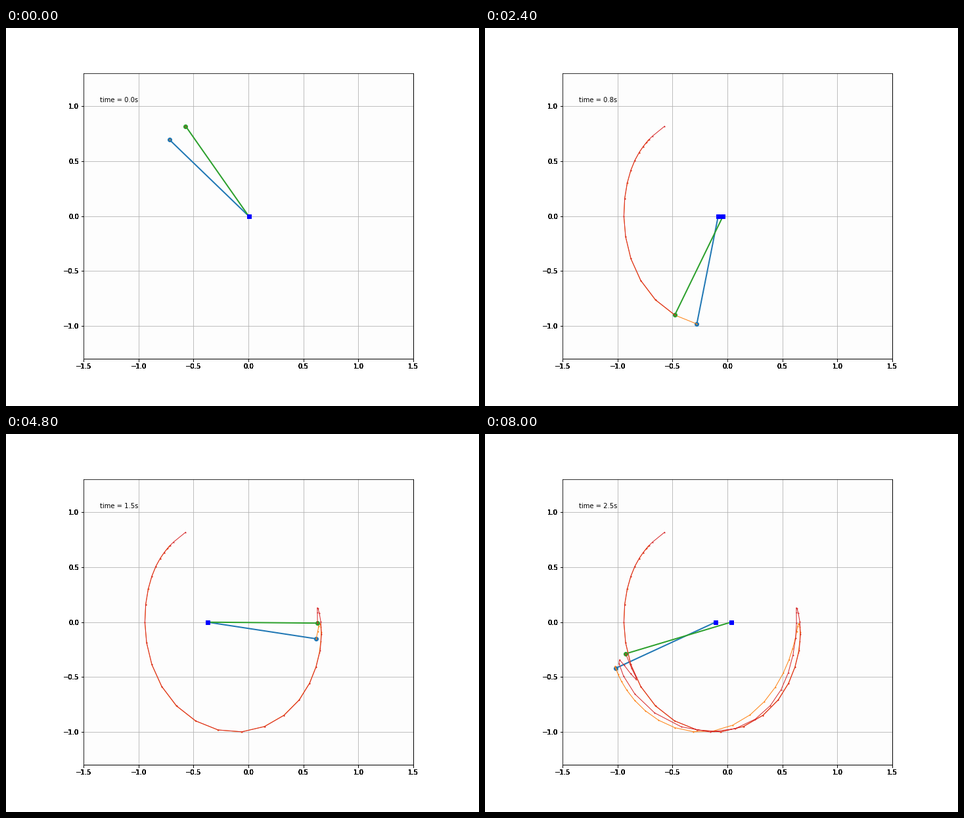
Recreate the animation shown at these times as a matplotlib script. Size 720x576 px, loop 8.16 s.

```python
import numpy as np
import matplotlib.pyplot as plt
from matplotlib.animation import FuncAnimation

FRAMES, INTERVAL, DT = 51, 160, 0.05
WIDTH, HEIGHT, UNIT = 720, 576, 167.4
CENTER_X, CENTER_Y = 369, 286.74
LAYERS = 8

plt.rcParams["font.family"] = "DejaVu Sans"
plt.rcParams["font.size"] = 10


def spline(start, spacing, keys):
    """Return a smooth cubic curve through evenly spaced keys."""
    k = np.asarray(keys, float)
    count = len(k)
    system = 4 * np.eye(count) + np.eye(count, k=1) + np.eye(count, k=-1)
    system[[0, -1]] = np.eye(count)[[0, -1]]
    rhs = 6 * np.gradient(k)
    rhs[[0, -1]] = np.gradient(k, edge_order=2)[[0, -1]]
    slope = np.linalg.solve(system, rhs)

    def curve(step):
        u = np.clip((np.asarray(step) - start) / spacing, 0, count - 1)
        i = np.minimum(u.astype(int), count - 2)
        t = u - i
        rise = k[i + 1] - k[i]
        bend = (1 - t) * (slope[i] - rise) - t * (slope[i + 1] - rise)
        return k[i] + t * rise + t * (1 - t) * bend

    return curve


# Angles in degrees from upright, counter-clockwise; cart positions in metres.
true_angle = spline(0, 5, [46, 59.4, 100.8, 168.8, 236.3, 267.6,
                           261.3, 223.6, 163.9, 122.6, 114.8])
true_cart = spline(0, 5, [0.003, 0.020, 0.056, -0.084, -0.277, -0.341,
                          -0.372, -0.355, -0.200, -0.121, -0.108])
drift_angle = spline(23, 3, [255.2, 274.7, 275, 252.5, 220.5,
                             179, 130.8, 110, 121.4, 106.7])
drift_cart = spline(23, 3, [-0.314, -0.352, -0.369, -0.358, -0.260,
                            -0.140, -0.085, -0.042, 0.023, 0.033])


def pole(angle, cart):
    a = np.radians(angle)
    return cart, cart - np.sin(a), np.cos(a)


# The estimate settles, trails the truth by about one step, then drifts away.
step = np.arange(FRAMES)
trailing = step < 23
guess_angle = np.where(trailing, true_angle(step - 1) - 11 * 0.24 ** step,
                       drift_angle(step))
guess_cart = np.where(trailing, true_cart(step - 1.1), drift_cart(step))
poles = [pole(true_angle(step), true_cart(step)),
         pole(guess_angle, guess_cart)]

fig = plt.figure(figsize=(WIDTH / 72, HEIGHT / 72), dpi=72, facecolor="white")
w, h = 3 * UNIT / WIDTH, 2.6 * UNIT / HEIGHT
left, bottom = CENTER_X / WIDTH - w / 2, 1 - CENTER_Y / HEIGHT - h / 2

# Stacked axes give the tick labels their heavy look.
for _ in range(LAYERS):
    ax = fig.add_axes([left, bottom, w, h], facecolor="#fdfdfd",
                      xlim=(-1.5, 1.5), ylim=(-1.3, 1.3))
    ax.set_xticks(np.arange(-1.5, 1.6, 0.5))
    ax.set_yticks(np.arange(-1.0, 1.1, 0.5))
ax.grid()

rods, traces = [], []
for _ in poles:
    rods += ax.plot([], [], "o-", lw=2)
    traces += ax.plot([], [], ".-", lw=1, ms=2)
blocks = [ax.plot([], [], "bs")[0] for _ in poles]
clock = ax.text(0.05, 0.9, "", transform=ax.transAxes)


def update(n):
    for (cart, x, y), rod, trace, block in zip(poles, rods, traces, blocks):
        rod.set_data([cart[n], x[n]], [0, y[n]])
        trace.set_data(x[:n + 1], y[:n + 1])
        block.set_data([cart[n]], [0])
    clock.set_text(f"time = {n * DT:.1f}s")
    return [*rods, *traces, *blocks, clock]


anim = FuncAnimation(fig, update, frames=FRAMES, interval=INTERVAL,
                     init_func=lambda: update(0), repeat=True, repeat_delay=0)
plt.show()
```
